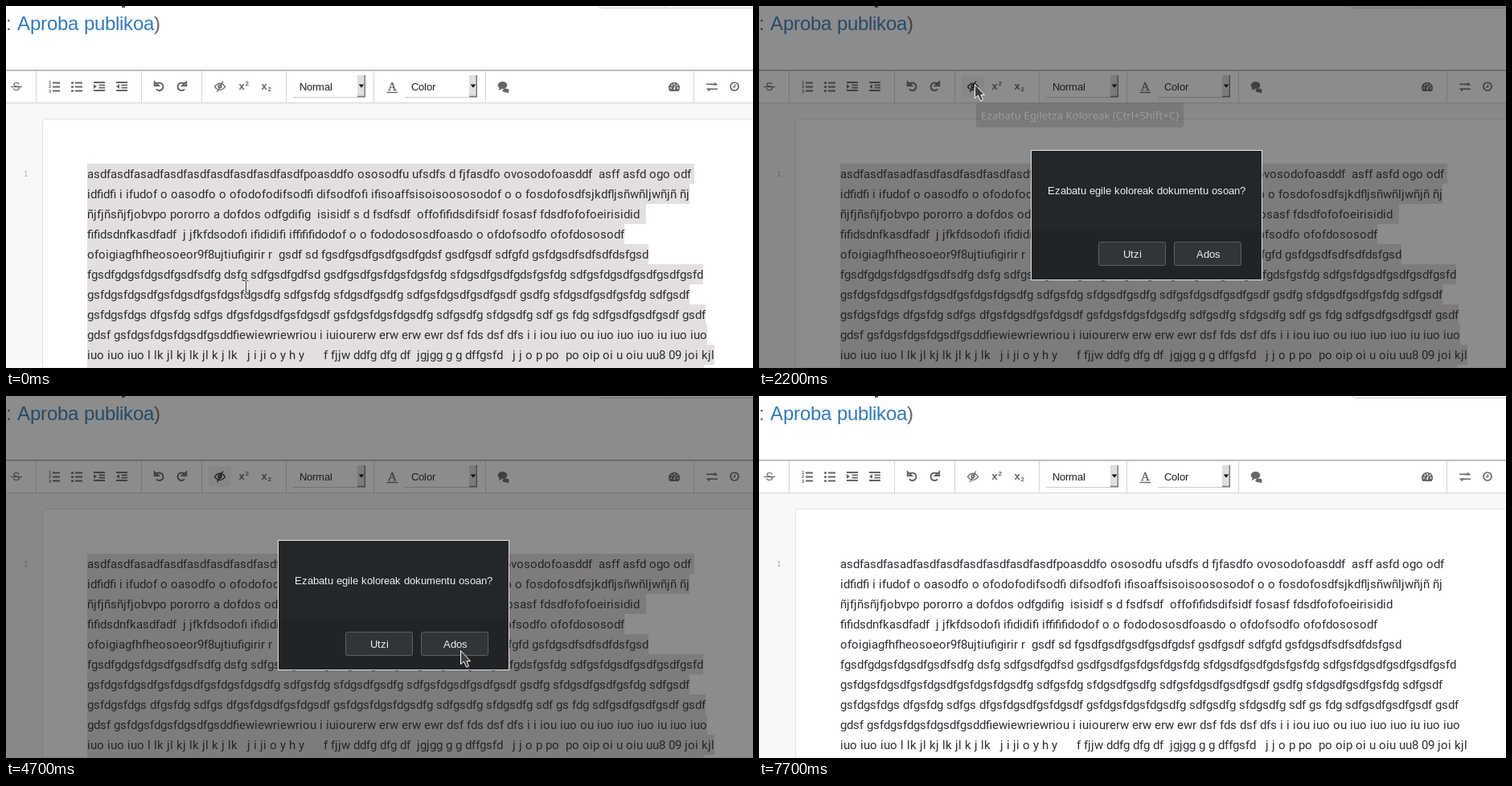
An HTML page that plays this animation: 929 by 450 pixels, repeating every 7.9 s.

```html
<!DOCTYPE html>
<html lang="eu">
<head>
<meta charset="utf-8">
<title>Editor</title>
<style>
  html, body { margin: 0; width: 100%; height: 100%; overflow: hidden; background: #fff; }
  svg { display: block; }
  text { white-space: pre; }
  .body { font: 15px Roboto, sans-serif; fill: #2c2f34; }
  .title { font: 24px "Liberation Sans", Arial, sans-serif; fill: #666; }
  .ui { font: 13px "Liberation Sans", Arial, sans-serif; fill: #222; }
  .modal { font: 13px "Liberation Sans", Arial, sans-serif; fill: #eee; }
  .tip { font: 13.33px "Noto Sans", sans-serif; fill: #fff; text-rendering: geometricPrecision; }
  .line { fill: none; stroke: #666; stroke-width: 2; }
  .solid { fill: #666; }
  .eye { fill: none; stroke: #666; stroke-width: 1.3; }
  .eye.hover { stroke: #1c1c1c; }
</style>
</head>
<body>
<svg id="stage" width="929" height="450" viewBox="0 0 929 450">
  <defs>
    <g id="select">
      <path d="M0 113.5H90" stroke="#ccc"/>
      <path d="M80 86h10v27H80z" fill="#dedede"/>
      <path d="M89.3 86v26.5H80" fill="none" stroke="#777" stroke-width="1.4"/>
      <path d="M81.7 97.5h6.6L85 101.5z" fill="#000"/>
    </g>
    <path id="undo" d="M187 97.2A4.8 4.8 0 1 1 187 103.4M184.8 94.5V99h5z"/>
    <path id="textLines" d="M109 95h14M115.5 98.4h7.5M115.5 101.7h7.5M109 105h14" stroke-width="1.8"/>
  </defs>

  <rect width="929" height="450" fill="#fff"/>
  <rect x="144" width="4" height="2" fill="#555"/>
  <path d="M737.5 0q0 2.5 4 2.5H929M820.5 0v2.5" fill="none" stroke="#ccc"/>
  <rect y="79" width="929" height="2" fill="#c0c0c0"/>
  <rect y="120" width="929" height="330" fill="#f8f8f8"/>
  <path d="M0 120.5H929M37.5 81v39M168.5 81v39M243.5 81v39M348.5 81v39M457.5 81v39M596.5 81v39M855.5 81v39" stroke="#d4d4d4"/>
  <path d="M929 140.5H49q-3.5 0-3.5 3.5V450H929" fill="#fff" stroke="#e2e2e2"/>
  <text x="22" y="211.5" fill="#aaa" style="font:9px 'DejaVu Sans Mono',monospace">1</text>

  <!-- toolbar icons -->
  <text x="8.3" y="105" class="solid" style="font:14px 'Liberation Sans',sans-serif">S</text>
  <path d="M6 100.5h14" class="line" style="stroke-width:1.2"/>
  <path d="M58 95.5h9M58 100.5h9M58 105.5h9M86 95.5h9M86 100.5h9M86 105.5h9" class="line"/>
  <g class="solid" style="font:bold 6px 'Liberation Sans',sans-serif">
    <text x="53" y="97">1</text><text x="53" y="102.3">2</text><text x="53" y="107.6">3</text>
    <circle cx="82.5" cy="95.5" r="1.6"/><circle cx="82.5" cy="100.5" r="1.6"/><circle cx="82.5" cy="105.5" r="1.6"/>
    <path d="M109 97l4 3-4 3zM141 97l-4 3 4 3z"/>
  </g>
  <use href="#textLines" stroke="#666"/>
  <use href="#textLines" x="28" stroke="#666"/>
  <use href="#undo" class="line"/>
  <use href="#undo" class="line" transform="translate(409 0) scale(-1 1)"/>
  <rect id="eyeBack" x="252" y="87" width="28" height="26" rx="2" fill="#f4f4f4"/>
  <g id="eye" class="eye">
    <path d="M259.5 100.3Q266 92 272.5 100.3Q266 108.6 259.5 100.3z"/>
    <circle cx="266" cy="100" r="2"/>
    <path d="M269.8 93.5L262.5 107"/>
  </g>
  <g class="solid" style="font:bold 13px 'Liberation Sans',sans-serif">
    <text x="289.5" y="104">x</text><text x="317.5" y="104">x</text>
    <text x="297.5" y="99" font-size="8" style="font-size:8px">2</text>
    <text x="325.5" y="106" style="font-size:8px">2</text>
  </g>
  <use href="#select" x="357"/>
  <use href="#select" x="496"/>
  <text x="474.8" y="105" class="solid" style="font:15.5px 'Liberation Serif',serif;stroke:#666;stroke-width:.3">A</text>
  <path d="M473.5 107.5h13.5" class="line" style="stroke-width:1.4"/>
  <g class="solid">
    <path d="M619 102.5q6-.5 6.7 2.2-.2 1.2-1 1.8l1 2-3-1q-3.700 .2-5.5-2z"/>
    <ellipse cx="617.5" cy="98.5" rx="5.800" ry="4.600"/>
    <path d="M614 101l-1.500 4 4.500-2z"/>
    <path d="M825.500 106a7 7 0 1 1 11 0z"/>
    <path d="M871 97.500h10v-3l4.500 4-4.500 0zM885 103.500h-10v3l-4.500-4 4.500 0z"/>
  </g>
  <g fill="#fff">
    <circle cx="827" cy="102" r=".9"/><circle cx="828.300" cy="98.500" r=".9"/><circle cx="831" cy="97" r=".9"/>
    <circle cx="834.500" cy="98.500" r=".9"/><circle cx="835.500" cy="102" r=".9"/>
    <path d="M831.800 98.500l.8.300-.8 5.200h-1.500z"/>
  </g>
  <path d="M871 97.300h11M874 103.300h11" class="line" style="stroke-width:1.500"/>
  <circle cx="906" cy="100" r="5" class="line" style="stroke-width:1.700"/>
  <path d="M906.500 97v3.700h-2.700" class="line" style="stroke-width:1.200"/>

  <g id="selection" fill="#e3dedf"></g>
  <g id="labels"></g>
  <rect id="caret" x="101" y="198" width="1" height="21" fill="#000"/>

  <g id="dialog">
    <rect width="929" height="450" fill="#1a1a1a" opacity=".5"/>
    <rect x="338.5" y="179.500" width="287" height="161" fill="#23272a" stroke="#e4e4e4"/>
    <rect x="339" y="278" width="286" height="62" fill="#202427"/>
    <g fill="#2f3538" stroke="#5c6163">
      <rect x="422.500" y="293.500" width="83" height="29" rx="2"/>
      <rect x="516.500" y="293.500" width="83" height="29" rx="2"/>
    </g>
    <g id="dialogLabels"></g>
  </g>
  <g id="tooltip">
    <rect x="270" y="120.500" width="258" height="30.500" rx="3" fill="#2b2b2b"/>
    <text x="276" y="141" class="tip">Ezabatu Egiletza Koloreak (Ctrl+Shift+C)</text>
  </g>
  <path id="arrow" d="M.5 .5V17.500L4.500 14 7.500 21 10.500 19.700 8 13.500H12.500z" fill="#3f3f3f" stroke="#fff"/>
  <g id="beam" fill="none">
    <path d="M-3 -8.500H3M0 -8.500V8.500M-3 8.500H3" stroke="#fff" stroke-width="2.500" opacity=".7"/>
    <path d="M-3 -8.500H-1L0 -7.500 1 -8.500H3M0 -7.500V7.500M-3 8.500H-1L0 7.500 1 8.500H3" stroke="#333"/>
  </g>
</svg>
<script>
const $ = id => document.getElementById(id);
const LOOP = 7900, LEFT = 101, LINE_HEIGHT = 25;
const measure = document.createElement('canvas').getContext('2d');

function add(parent, name, attributes) {
  const node = document.createElementNS('http://www.w3.org/2000/svg', name);
  for (const key in attributes) node.setAttribute(key, attributes[key]);
  return parent.appendChild(node);
}

// Sets text with whole-pixel advances, as fully hinted fonts do; returns its width.
function label(parent, className, x, y, string, fill) {
  const text = add(parent, 'text', { class: className, y });
  if (fill) text.style.fill = fill;
  const style = getComputedStyle(text);
  measure.font = `${style.fontSize} ${style.fontFamily}`;
  let pen = x;
  for (const cluster of string.match(/ffi|ff|fi|fl|./g)) {
    const width = measure.measureText(cluster).width;
    add(text, 'tspan', { x: pen }).textContent = cluster.replace(' ', '\u00a0');
    pen += cluster.length > 1 ? Math.floor(width) : Math.round(width);
  }
  return pen - x;
}

const lines = [
  'asdfasdfasadfasdfasdfasdfasdfasdfasdfpoasddfo ososodfu ufsdfs d fjfasdfo ovosodofoasddf  asff asfd ogo odf ',
  'idfidfi i ifudof o oasodfo o ofodofodifsodfi difsodfofi ifisoaffsisoisoososodof o o fosdofosdfsjkdfljsñwñljwñjñ ñj',
  'ñjfjñsñjfjobvpo pororro a dofdos odfgdifig  isisidf s d fsdfsdf  offofifidsdifsidf fosasf fdsdfofofoeirisidid  ',
  'fifidsdnfkasdfadf  j jfkfdsodofi ifididifi iffififidodof o o fododososdfoasdo o ofdofsodfo ofofdososodf',
  'ofoigiagfhfheosoeor9f8ujtiufigirir r  gsdf sd fgsdfgsdfgsdfgsdfgdsf gsdfgsdf sdfgfd gsfdgsdfsdfsdfdsfgsd',
  'fgsdfgdgsfdgsdfgsdfsdfg dsfg sdfgsdfgdfsd gsdfgsdfgsfdgsfdgsfdg sfdgsdfgsdfgdsfgsfdg sdfgsfdgsdfgsdfgsdfgsfd',
  'gsfdgsfdgsdfgsfdgsdfgsfdgsfdgsdfg sdfgsfdg sfdgsdfgsdfg sdfgsfdgsdfgsdfgsdf gsdfg sfdgsdfgsdfgsfdg sdfgsdf',
  'gsfdgsfdgs dfgsfdg sdfgs dfgsfdgsdfgsfdgsdf gsfdgsfdgsfdgsdfg sdfgsdfg sfdgsdfg sdf gs fdg sdfgsdfgsdfgsdf gsdf',
  'gdsf gsfdgsfdgsfdgsdfgsddfiewiewriewriou i iuiourerw erw erw ewr dsf fds dsf dfs i i iou iuo ou iuo iuo iuo iu iuo iuo',
  'iuo iuo iuo l lk jl kj lk jl k j lk   j i ji o y h y      f fjjw ddfg dfg df  jgjgg g g dffgsfd   j j o p po  po oip oi u oiu uu8 09 joi kjl'
];
const highlight = (row, width) =>
  add($('selection'), 'rect', { x: LEFT, y: 196 + row * LINE_HEIGHT, width, height: LINE_HEIGHT });

lines.forEach((line, row) =>
  highlight(row, label($('labels'), 'body', LEFT, 214 + row * LINE_HEIGHT, line)));
highlight(lines.length, 767);

label($('labels'), 'title', 0, 30, ':');
label($('labels'), 'title', 14, 30, 'Aproba publikoa', '#337ab7');
label($('labels'), 'title', 184, 30, ')');
label($('labels'), 'ui', 365, 105, 'Normal');
label($('labels'), 'ui', 504, 105, 'Color');
label($('dialogLabels'), 'modal', 359, 234, 'Ezabatu egile koloreak dokumentu osoan?');
label($('dialogLabels'), 'modal', 453, 313, 'Utzi');
label($('dialogLabels'), 'modal', 544, 313, 'Ados');

// Pointer path: time, x, y
const path = [
  [0, 298.5, 350], [100, 298.5, 350], [200, 289.5, 346], [300, 289.5, 346],
  [400, 227.5, 257], [500, 227.5, 257], [800, 265, 76], [900, 265, 76],
  [1400, 268, 97], [3400, 268, 97], [3500, 292, 160], [4200, 525, 311],
  [4500, 565, 317], [4600, 565, 317], [4700, 565, 316], [4900, 565, 316],
  [5000, 566.5, 318], [6900, 566.5, 318], [7600, 75, 4], [LOOP, 75, 4]
];

function pointerAt(t) {
  const i = path.findIndex(key => key[0] > t);
  const [t0, x0, y0] = path[i - 1], [t1, x1, y1] = path[i];
  const k = (t - t0) / (t1 - t0);
  return [x0 + (x1 - x0) * k, y0 + (y1 - y0) * k];
}

const show = (id, visible) => { $(id).style.display = visible ? '' : 'none'; };

function draw(now) {
  const t = Math.floor(now % LOOP / 100) * 100;
  const modal = t >= 2200 && t < 5000;
  const hover = t >= 1000 && t < 5100;
  const [x, y] = pointerAt(t);
  const overPage = !modal && y > 141 && x > 46;
  const pointerVisible = t < 7700;

  show('selection', t < 5000);
  show('dialog', modal);
  show('eyeBack', hover);
  $('eye').classList.toggle('hover', hover);
  show('caret', t >= 5000 && t < 6300);
  $('tooltip').style.opacity = { 2000: .6, 2100: .42, 2200: .17 }[t] || 0;
  show('arrow', pointerVisible && !overPage);
  show('beam', pointerVisible && overPage);
  const place = `translate(${Math.round(x)} ${Math.round(y)})`;
  $('arrow').setAttribute('transform', place);
  $('beam').setAttribute('transform', `translate(${Math.floor(x) + .5} ${Math.round(y)})`);
  requestAnimationFrame(() => draw(performance.now() - start));
}
const start = performance.now();
draw(0);
</script>
</body>
</html>
```
